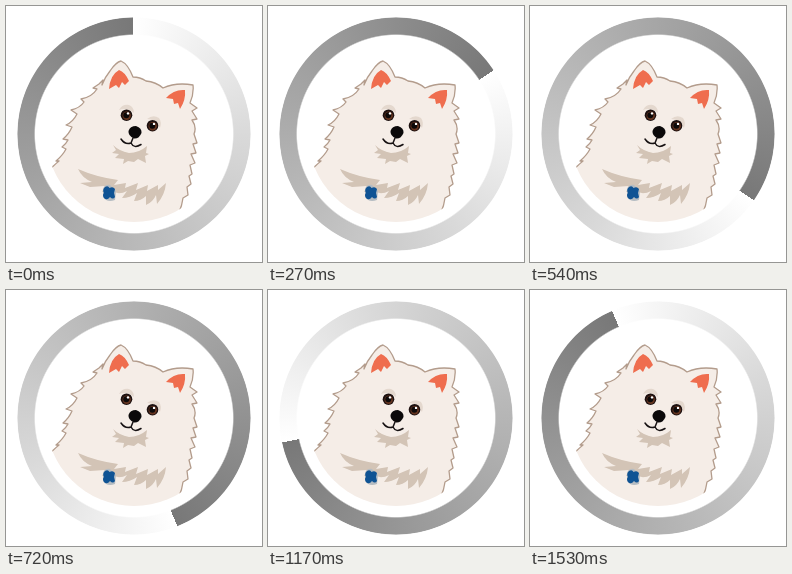
An HTML page for the animation above (1.62 s loop, 256 by 256 pixels).

```html
<!DOCTYPE html>
<html lang="en">
<head>
<meta charset="utf-8">
<title>Dog loader</title>
<style>
  html, body { margin: 0; width: 100%; height: 100%; overflow: hidden; background: #fff; }
  .stage { position: relative; width: 256px; height: 256px; }
  .ring {
    position: absolute; left: 11px; top: 11px; width: 234px; height: 234px; border-radius: 50%;
    background: conic-gradient(from var(--turn, 0deg) at 49.7% 50.8%, #fff, #d9d9d9 25%, #b9b9b9 50%, #9a9a9a 75%, #787878);
    -webkit-mask: radial-gradient(circle, transparent 98.6px, #000 100px, #000 116px, transparent 117.2px);
    mask: radial-gradient(circle, transparent 98.6px, #000 100px, #000 116px, transparent 117.2px);
  }
  svg { position: absolute; left: 0; top: 0; }
  .fur { fill: #f5ede7; stroke: #b39c8c; stroke-width: 1.3; stroke-linejoin: round; }
  .shade { fill: #d3c4b6; }
  .ear { fill: #ef6d4e; }
  .line { fill: none; stroke: #161112; stroke-width: 1.5; stroke-linecap: round; stroke-linejoin: round; }
</style>
</head>
<body>
<div class="stage">
  <div class="ring" id="ring"></div>
  <svg width="256" height="256" viewBox="0 0 256 256">
    <defs>
      <clipPath id="badge"><circle cx="128" cy="128" r="88"/></clipPath>
      <g id="eye">
        <circle r="5.8" fill="#1d1110"/>
        <circle cx=".2" cy=".6" r="4.2" fill="#663520"/>
        <circle cx="-.2" r="3" fill="#0d0909"/>
        <circle cx="1.5" cy="-1.8" r="1.2" fill="#fff"/>
      </g>
    </defs>
    <g clip-path="url(#badge)">
      <path class="fur" d="M93 78L97 74L96 79Q99 71 104 65Q110 56 115 55Q122 58 127 71Q134 71 140 75Q150 76 157 82
        Q170 76 187 79Q188 88 184 97L191 102L186 105L191 113L186 114Q191 121 188 128L191 137L187 138
        L190 147L185 148L189 157L184 159L186 168L183 170L185 178L181 181L182 189L177 192Q176 200 173 206
        L150 230H62L34 176Q44 162 53 155L50 155Q57 149 60 143L56 141Q60 138 62 134L57 133Q63 128 66 121
        L60 119Q67 116 71 108L65 104Q74 102 78 96L75 93Q86 91 91 83L87 82Z"/>
      <path class="ear" d="M103 83Q104 69 113 64Q119 66 123 75L119 79L116 76L113 82L110 79Z"/>
      <path class="ear" d="M160 92Q168 83 179 84Q180 94 174 103L172 97L168 98L167 93Z"/>
      <path class="shade" d="M113 104Q116 98 123 99Q128 101 128 107Q121 101 113 104ZM141 113Q147 108 153 112Q156 116 154 122Q149 113 141 113Z" opacity=".5"/>
      <path class="shade" d="M107 139Q113 145 123 147Q133 147 141 140L140 147L143 148L139 150L140 157L132 153L128 156L122 155L117 158L118 153L109 152L113 148L106 147L110 144Z"/>
      <path class="shade" d="M72 163Q90 171 112 174L108 179L120 177L119 182L132 177L130 184L142 179L141 185L152 179L152 184L160 177
        Q159 189 151 198L150 189Q147 196 140 199L140 190Q135 195 128 195L131 187Q124 192 116 192L121 185
        Q112 190 104 184L96 186L99 180L84 181L74 177L86 176Q76 172 72 163Z"/>
    </g>
    <use href="#eye" transform="translate(120.500 109.200)"/>
    <use href="#eye" transform="translate(146.500 119.700)"/>
    <path d="M122.500 125Q124 120 130 120Q136 122 135.500 127Q133 133 128 132.500Q122 130 122.500 125Z" fill="#0b090a"/>
    <path class="line" d="M127 132L125 137Q119 139 115 133M125 137Q128 143 135 138.500"/>
    <path d="M97 183Q99 178 104 179L110 185L109 194Q101 197 97 191Z" fill="#b5bcc2"/>
    <path d="M99 181Q102 179 103.500 182Q107 180 109 183L108 187L109 191Q107 194 104 191Q101 195 98 192Q96 189 98 187Q96 184 99 181Z" fill="#0f5394"/>
  </svg>
</div>
<script>
  const ring = document.getElementById('ring');
  const STEP = 90, STEPS = 18, SLOTS = 32;
  // 18 even time steps land on the nearest of 32 dial positions
  function draw(now) {
    const step = Math.floor(now / STEP) % STEPS;
    const slot = Math.round(step * SLOTS / STEPS);
    ring.style.setProperty('--turn', slot * 360 / SLOTS + 'deg');
    requestAnimationFrame(draw);
  }
  draw(performance.now());
</script>
</body>
</html>
```
